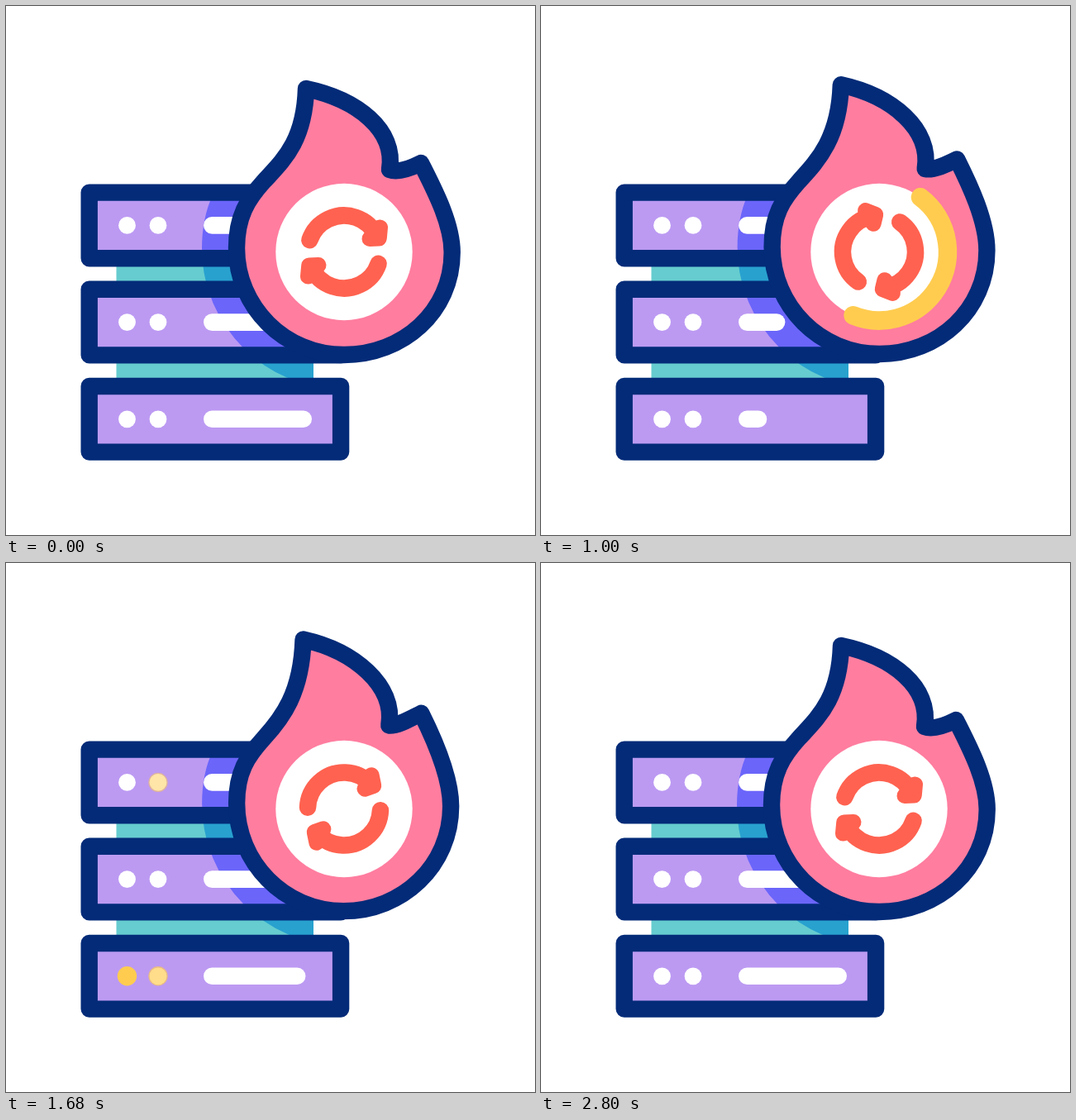
These frames come from a looping animation (640 px wide and 640 px high, 3 s). An HTML page with a canvas:

```html
<!DOCTYPE html>
<html lang="en">
<head>
<meta charset="utf-8">
<title>Server flame</title>
<style>
  html, body { margin: 0; width: 100%; height: 100%; overflow: hidden; background: #fff; }
  canvas { display: block; width: 640px; height: 640px; }
</style>
</head>
<body>
<canvas id="stage" width="640" height="640"></canvas>
<script>
const ctx = document.getElementById('stage').getContext('2d');
const LOOP = 3000, ACTIVE = 2800, STEP = 40, TAU = 2 * Math.PI;
const NAVY = '#032b78', PURPLE = '#bc9af2', INDIGO = '#6b65fa', TEAL = '#66cccf',
      BLUE = '#28a1cf', PINK = '#ff7d9f', RED = '#ff6250', YELLOW = '#ffcc50';
const HUB = { x: 409, y: 297.5 };
const rowY = row => 265.4 + 117.2 * row;

const clamp = v => Math.max(0, Math.min(1, v));
const rad = deg => deg * Math.PI / 180;
const progress = (t, from, to) => clamp((t - from) / (to - from));
const easeSine = u => (1 - Math.cos(Math.PI * u)) / 2;

// The flame flickers and sways freely, but rests at both ends of the loop.
const calm = t => easeSine(clamp(Math.min(t, ACTIVE - t) / 360));
const stretch = t => calm(t) * (12.5 + 8.5 * Math.sin(TAU * (t / 560 - 0.1)));
const sway = t => calm(t) * 6.5 * Math.sin(TAU * (t - 340) / 1360);

// One full turn, then a slow wobble back to rest.
const spin = t => 360 * easeSine(progress(t, 500, 1870))
  + 8 * Math.sin(Math.PI * progress(t, 1870, ACTIVE));
const sweepHead = t => -90 + 540 * (1 - (1 - progress(t, 660, 1710)) ** 1.2);
const sweepTail = t => -90 + 540 * progress(t, 763, 1668) ** 2;

// Each bar shrinks and grows twice, one row after another.
function barEnd(t, row) {
  const cycles = 2 * progress(t, 30 + 155 * row, 2490 + 155 * row);
  return 321 + 49 * Math.cos(TAU * cycles);
}

// Blink times of the left light in each row; the right one follows.
const BLINKS = [[310, 1430], [260, 1380], [660, 1620]];
const BLINK_LAG = 150;
const glow = (t, row, i) => Math.max(...BLINKS[row].map(
  peak => clamp((130 - Math.abs(t - peak - BLINK_LAG * i)) / 60)));

function line(color, width, path) {
  ctx.strokeStyle = color;
  ctx.lineWidth = width;
  path ? ctx.stroke(path) : ctx.stroke();
}

function disc(x, y, r, color) {
  ctx.fillStyle = color;
  ctx.beginPath();
  ctx.arc(x, y, r, 0, TAU);
  ctx.fill();
}

function flamePath(t) {
  const s = stretch(t), w = sway(t), p = new Path2D();
  const tip = [363 + 2 * w - 0.3 * s, 100 - s];
  const notch = [464 + 1.1 * w, 198 - 0.2 * s];
  const spur = [502 + 1.1 * w + 0.13 * s, 190 - 1.05 * s + 0.6 * w];
  const right = [539.7 + 0.7 * w - 0.15 * s, 298 - 0.5 * s];
  const base = [409 + w, 422 - 0.15 * s - 0.45 * w];
  const left = [279 + 0.55 * w + 0.06 * s, 293 - 0.3 * s];
  const neck = [312 + 0.2 * w, 212];
  const curve = (a, ax, ay, b, bx, by) =>
    p.bezierCurveTo(a[0] + ax, a[1] + ay, b[0] + bx, b[1] + by, ...b);
  p.moveTo(...tip);
  curve(tip, 62, 13 + 0.1 * s, notch, 8, -48);
  curve(notch, 10, 4 - 0.4 * s, spur, -12, 6);
  curve(spur, 15, 30, right, 0, -36);
  curve(right, 0, 72, base, 71, 0);
  curve(base, -72, 0, left, 0, 71);
  curve(left, 0, -38, neck, -20, 22);
  curve(neck, 22, -24, tip, -2, 65);
  p.closePath();
  return p;
}

// Fills rectangles and darkens the part inside the flame's wide halo.
function region(rects, color, shade, flame) {
  const area = new Path2D();
  rects.forEach(r => area.rect(...r));
  ctx.fillStyle = color;
  ctx.fill(area);
  ctx.save();
  ctx.clip(area);
  ctx.fillStyle = shade;
  ctx.fill(flame);
  line(shade, 84, flame);
  ctx.restore();
}

function drawServers(t, flame) {
  const rows = [0, 1, 2];
  const boxes = rows.map(row => [100.7, rowY(row) - 39.8, 304.4, 79.6]);
  const links = rows.slice(0, 2).map(row => [133.5, rowY(row) + 45, 238.5, 28]);
  region(links, TEAL, BLUE, flame);
  region(boxes, PURPLE, INDIGO, flame);
  for (const row of rows) {
    const y = rowY(row);
    ctx.beginPath();
    ctx.rect(...boxes[row]);
    line(NAVY, 20.4);
    [146.5, 184].forEach((x, i) => {
      disc(x, y, 10.4, '#fff');
      ctx.globalAlpha = glow(t, row, i);
      disc(x, y, 11.7, YELLOW);
      ctx.globalAlpha = 1;
    });
    ctx.beginPath();
    ctx.moveTo(249.3, y);
    ctx.lineTo(barEnd(t, row) - 10.3, y);
    line('#fff', 20.6);
  }
}

function drawArrow() {
  ctx.beginPath();
  ctx.arc(0, 0, 44, rad(199), rad(336));
  line(RED, 20.5);
  ctx.beginPath();
  ctx.moveTo(43.5, -29.5);
  ctx.lineTo(42.3, -16.5);
  ctx.lineTo(31, -16);
  ctx.closePath();
  ctx.fillStyle = RED;
  ctx.fill();
  line(RED, 19);
}

function drawBadge(t) {
  disc(HUB.x, HUB.y, 82.7, '#fff');
  const head = sweepHead(t), tail = sweepTail(t);
  if (head > tail) {
    ctx.beginPath();
    ctx.arc(HUB.x, HUB.y, 83, rad(tail), rad(head));
    line(YELLOW, 22.5);
  }
  for (const turn of [0, 180]) {
    ctx.save();
    ctx.translate(HUB.x, HUB.y);
    ctx.rotate(rad(spin(t) + turn));
    drawArrow();
    ctx.restore();
  }
}

function draw(t) {
  ctx.fillStyle = '#fff';
  ctx.fillRect(0, 0, 640, 640);
  ctx.lineCap = ctx.lineJoin = 'round';
  const flame = flamePath(t);
  drawServers(t, flame);
  ctx.fillStyle = PINK;
  ctx.fill(flame);
  line(NAVY, 20.4, flame);
  drawBadge(t);
}

const start = performance.now();
function tick() {
  const t = (performance.now() - start) % LOOP;
  draw(Math.min(ACTIVE, Math.floor(t / STEP) * STEP));
  requestAnimationFrame(tick);
}
tick();
</script>
</body>
</html>
```
